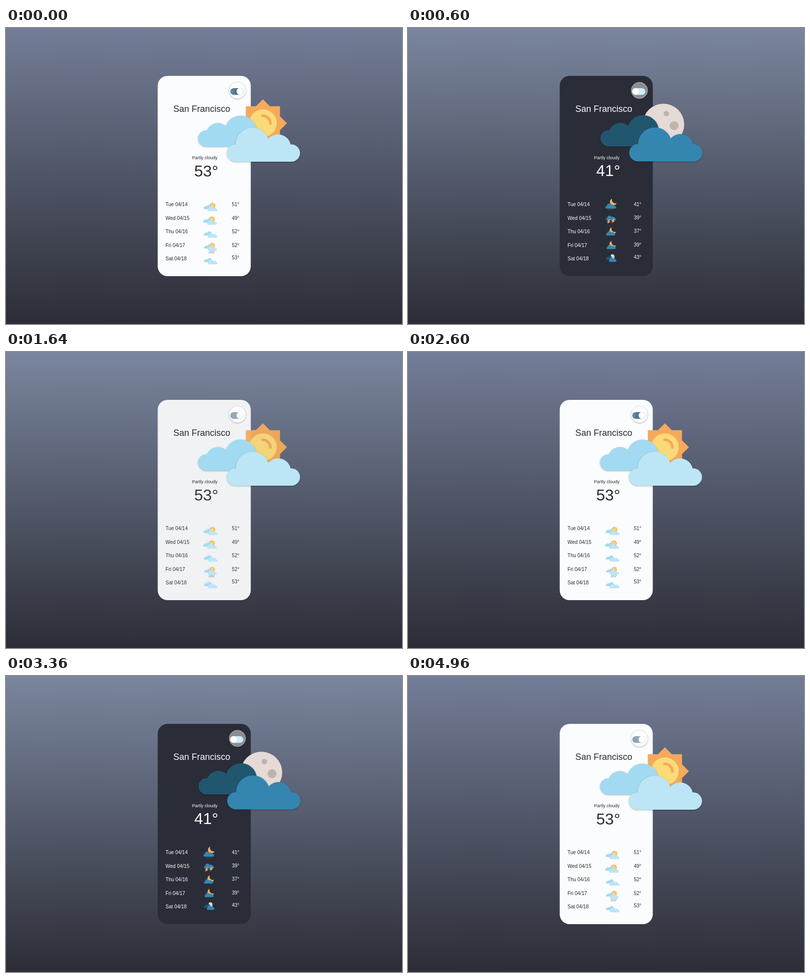
Write an HTML page that moves like this. It is 800 px wide and 600 px high and loops after 5 s.

```html
<!DOCTYPE html>
<html lang="en">
<head>
<meta charset="utf-8">
<title>Weather card</title>
<style>
  html, body { margin: 0; height: 100%; overflow: hidden; }
  svg { display: block; width: 800px; height: 600px; font-family: "Liberation Sans", Arial, sans-serif; }
  .shadow { filter: drop-shadow(0 1.5px 1.5px rgba(0, 0, 0, .28)); }
</style>
</head>
<body>
<svg viewBox="0 0 800 600">
  <defs>
    <linearGradient id="sky" x2="0" y2="1">
      <stop id="skyTop"/><stop offset="1" stop-color="#2c2d36"/>
    </linearGradient>
    <linearGradient id="track">
      <stop offset=".1" stop-color="#648a9c"/><stop offset=".6" stop-color="#42687c"/>
    </linearGradient>
    <path id="back" d="M404.5 240.5a16.5 16.5 0 0 1 0-33h1.5a24 24 0 0 1 38-9a32 32 0 1 1 50 36q-4 6-12 6z"/>
    <path id="front" d="M463.500 271a17.500 17.500 0 0 1 0-35h.5a34 34 0 0 1 66-11.500a26 26 0 0 1 45 11.500h1.500a17.500 17.500 0 0 1 0 35z"/>
    <g id="sun">
      <g fill="#f4aa5a">
        <rect x="484.500" y="158.500" width="69" height="69"/>
        <path d="M519 144.500L567.500 193L519 241.500L470.500 193z"/>
      </g>
      <circle cx="519" cy="193" r="28" fill="#fbda79"/>
      <path d="M518.500 178a15.500 15.500 0 0 1 15.500 15.500" fill="none" stroke="#f4aa5a" stroke-width="5.500" stroke-linecap="round"/>
    </g>
    <g id="moon">
      <circle cx="516" cy="195.500" r="42" fill="#e6dad6"/>
      <g fill="#bfb3ae"><circle cx="522" cy="173.500" r="5.500"/><circle cx="537.500" cy="198" r="9"/></g>
    </g>
    <path id="crescent" d="M5 0A7 7 0 1 0 14 9A7 7 0 0 1 5 0" fill="#f4ae60"/>
    <path id="bolt" d="M4 0L0 5H3L1 9L8 3.500H4.500L7 0z" fill="#f4aa5a"/>
  </defs>
  <rect width="800" height="600" fill="url(#sky)"/>
  <rect id="card" x="306.500" y="97" width="188" height="406" rx="20"/>
  <g id="night"></g>
  <g id="day"></g>
  <g id="labels">
    <text x="338" y="169.500" font-size="18">San Francisco</text>
    <text id="summary" x="375.800" font-size="9">Partly cloudy</text>
  </g>
  <g id="clouds">
    <use id="bigBack" class="shadow" href="#back"/>
    <use id="bigFront" class="shadow" href="#front"/>
  </g>
</svg>
<script>
const el = id => document.getElementById(id);
const DAY = { ink: '#2b2b30', back: '#a2daf2', front: '#bce5f5' };
const NIGHT = { ink: '#fafafa', back: '#21566f', front: '#3486b0' };
const dates = ['Tue 04/14', 'Wed 04/15', 'Thu 04/16', 'Fri 04/17', 'Sat 04/18'];

const use = (id, fill = '', at = '0 0') => `<use href="#${id}" fill="${fill}" transform="translate(${at})"/>`;
const text = (x, y, size, value) => `<text x="${x}" y="${y}" font-size="${size}">${value}</text>`;
const pair = c => use('back', c.back) + use('front', c.front);

// Reduced copy of large artwork: its corner (ox, oy) lands on (x, y).
const mini = (x, y, ox, oy, scale, art) =>
  `<g transform="translate(${x} ${y}) scale(${scale}) translate(${-ox} ${-oy})">${art}</g>`;
const sunny = (x, y, s) => mini(x, y, 388, 145, s, use('sun') + pair(DAY));
const cloudy = (x, y) => mini(x, y, 388, 177, .134, pair(DAY));
const puff = (x, y, s) => mini(x, y, 446, 202, s, use('front', NIGHT.front));

function rain(x, y, rows, color) {
  let d = '';
  for (let r = 0; r < rows; r++)
    for (let i = 0; i < 4; i++) d += `M${x + i * 3 + 1.5 - r} ${y + r * 3}l-1 2`;
  return `<path d="${d}" stroke="${color}" stroke-width=".9"/>`;
}

function forecast(theme, temps, ys) {
  return `<g fill="${theme.ink}">` + dates.map((date, i) =>
    text(322.3, 361 + i * 27.5, 10, date) + text(456.2, ys[i], 10, temps[i] + '°')).join('') + '</g>';
}

function toggle(knobX, face, rim, trackFill, id) {
  return `<g class="shadow"><circle cx="467.500" cy="126.500" r="16.500" fill="${face}" stroke="${rim}"/></g>
    <rect id="${id}" x="453" y="122" width="26.500" height="13.500" rx="6.750" fill="${trackFill}"/>
    <circle cx="${knobX}" cy="128.600" r="6.800" fill="#fdfdfe"/>`;
}

el('day').innerHTML = use('sun') + toggle(472.5, '#fbfcfe', '#eceef2', '', 'dayTrack') +
  `<g fill="${DAY.ink}">${text(380.3, 300.5, 32, '53°')}</g>` +
  forecast(DAY, [51, 49, 52, 52, 53], [361, 388.5, 416, 443.5, 469]) +
  sunny(399, 354, .137) + sunny(398, 381.5, .137) + cloudy(399.5, 412.3) +
  sunny(400, 435, .126) + rain(410.5, 451.5, 2, '#3a4650') + cloudy(399.8, 466.3);

el('night').innerHTML = use('moon') + toggle(459.8, '#8c8d93', '#b4b5b9', '#cdeef8', 'nightTrack') +
  `<g fill="${NIGHT.ink}">${text(380.3, 299.5, 32, '41°')}</g>` +
  forecast(NIGHT, [41, 39, 37, 39, 43], [360.5, 387.5, 415, 442.5, 467.5]) +
  use('crescent', '', '407.5 346') + puff(399, 356, .145) + rain(404, 366.5, 1, '#3486b0') +
  puff(400, 380.5, .137) + use('bolt', '', '401.5 388.5') + use('bolt', '', '410.5 387') +
  use('crescent', '', '406.5 404') + puff(400, 412, .125) +
  use('crescent', '', '406.5 431.5') + puff(401, 439.5, .125) +
  mini(400, 458.5, 388, 154, '.102 .132', use('moon') + pair(NIGHT));

const switches = [40, 1252, 2760, 4004]; // alternately to night and to day
const fade = 500;
const mix = (a, b, p) => a + (b - a) * p;

function draw(now) {
  const t = now % 5000;
  const passed = switches.filter(s => t >= s).length;
  const toDay = passed % 2 === 0;
  const x = passed ? Math.min(1, (t - switches[passed - 1]) / fade) : 1;
  const eased = 1 - (1 - x) ** 2;
  const light = toDay ? eased : 1 - eased;
  const theme = toDay ? DAY : NIGHT;

  el('skyTop').setAttribute('stop-color', light > .97 ? '#737d97' : '#7a869f');
  el('card').setAttribute('fill', `rgb(${mix(42, 251, light)},${mix(45, 252, light)},${mix(56, 254, light)})`);
  el('day').setAttribute('opacity', light);
  el('night').setAttribute('opacity', 1 - light);
  el('labels').setAttribute('fill', theme.ink);
  el('summary').setAttribute('y', toDay ? 266.4 : 265.6);
  el('bigBack').setAttribute('fill', theme.back);
  el('bigFront').setAttribute('fill', theme.front);
  el('clouds').setAttribute('transform', `translate(${mix(.8, 0, light)} ${mix(-.6, 0, light)})`);
  const hovered = t < switches[1] || (t > 2200 && t < switches[3]);
  el('dayTrack').setAttribute('fill', hovered ? 'url(#track)' : '#8fa5b4');
}

function loop() {
  draw(performance.now());
  requestAnimationFrame(loop);
}
loop();
</script>
</body>
</html>
```
